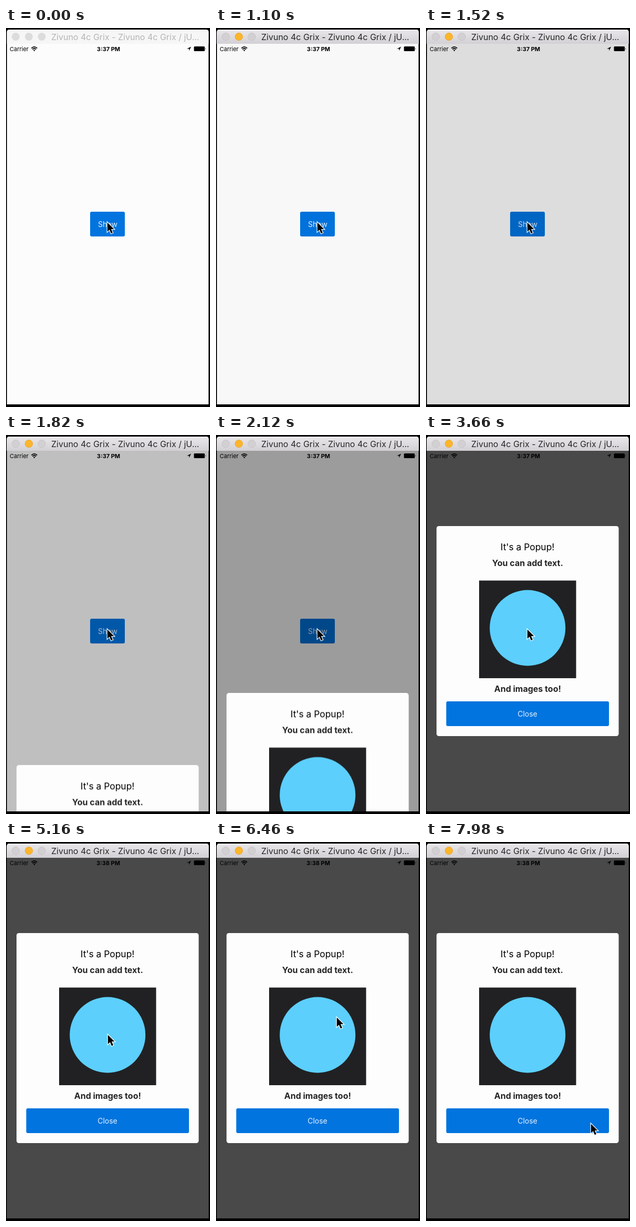
Write an HTML page that moves like this. It is 388 px wide and 720 px high and loops after 8 s.

```html
<!DOCTYPE html>
<html lang="en">
<head>
<meta charset="utf-8">
<title>Popup demo</title>
<style>
  html, body { margin: 0; width: 100%; height: 100%; overflow: hidden; background: #000; }
  svg { display: block; width: 388px; height: 720px; font-family: Inter, sans-serif; }
  .mid { text-anchor: middle; }
  .bold { font-weight: 700; }
  .button { fill: #0274df; }
  .label { font-size: 14px; fill: #e6f1fc; }
</style>
</head>
<body>
<svg viewBox="0 0 388 720">
  <defs>
    <linearGradient id="bar" x2="0" y2="1">
      <stop stop-color="#e9e7ea"/>
      <stop offset="1" stop-color="#d2d0d4"/>
    </linearGradient>
    <clipPath id="screen"><path d="M1.5 30H385.5V715H1.5Z"/></clipPath>
  </defs>

  <!-- window title bar -->
  <path d="M1.5 30V8q0-5 5-5H380.5q5 0 5 5V30Z" fill="#f6f6f6"/>
  <g fill="#dcdcdc">
    <circle cx="18.5" cy="16.5" r="7.5"/>
    <circle cx="43.5" cy="16.5" r="7.5"/>
    <circle cx="68" cy="16.5" r="7.5"/>
  </g>
  <g id="activeBar">
    <path d="M1.5 30V8q0-5 5-5H380.5q5 0 5 5V30Z" fill="url(#bar)"/>
    <g fill="#d3d0d3" stroke="#c2bfc2" stroke-width=".8">
      <circle cx="18.5" cy="16.5" r="7.2"/>
      <circle cx="43.5" cy="16.5" r="7.2" fill="#fdb52b" stroke="#e3a02a"/>
      <circle cx="68" cy="16.5" r="7.2"/>
    </g>
  </g>
  <text id="title" x="86" y="22.5" font-size="16">Zivuno 4c Grix - Zivuno 4c Grix / jU...</text>

  <g clip-path="url(#screen)">
    <rect x="1.5" y="30" width="384" height="685" fill="#fcfcfc"/>

    <!-- status bar -->
    <text x="7" y="43.8" font-size="11">Carrier</text>
    <path d="M48.3 38.3q5.5-4.8 11 0M50.3 40.5q3.5-3 7 0" fill="none" stroke="#000" stroke-width="1.7"/>
    <path d="M51.9 42.2q1.9-1.6 3.8 0L53.8 44.2Z"/>
    <g class="mid bold" font-size="11">
      <text id="early" x="195" y="43.8">3:37 PM</text>
      <text id="late" x="194.5" y="43.8">3:38 PM</text>
    </g>
    <path d="M352 35.5L348.3 43.5V39.5H344Z"/>
    <rect x="357.5" y="35" width="20.5" height="9" rx="1.5"/>
    <path d="M379 37.8q1.8 1.7 0 3.4Z"/>

    <rect class="button" x="160" y="349" width="66" height="47" rx="3"/>
    <text class="mid label" x="193.5" y="378">Show</text>

    <rect id="shade" x="1.5" y="30" width="384" height="685"/>

    <g id="popup">
      <rect x="20" y="173" width="346.5" height="399" rx="4.5" fill="#fdfdfd"/>
      <text class="mid" x="193" y="218.7" font-size="17.4">It's a Popup!</text>
      <g class="mid bold" font-size="16" fill="#252525">
        <text x="193.3" y="248.8">You can add text.</text>
        <text x="193.3" y="487.6">And images too!</text>
      </g>
      <rect x="101" y="276.500" width="184.5" height="185.5" fill="#212123"/>
      <circle cx="193.2" cy="366.5" r="72" fill="#5ccffd"/>
      <rect class="button" x="38.5" y="506" width="309.5" height="47" rx="3"/>
      <text class="mid label" x="193" y="535">Close</text>
    </g>
  </g>

  <path id="cursor" d="M.8 1.5V19L4.9 15.2L7.9 22.2L11 20.9L8 14H13.4Z"
        stroke="#fff" stroke-width="2.4" paint-order="stroke fill"/>
</svg>
<script>
const LOOP = 8000;
const FOCUS = 700, OPEN = 900, HALF = 2068, SETTLED = 3237, MINUTE = 4180;
const EASE_IN = 'cubic-bezier(.42, 0, 1, 1)';
const EASE_OUT = 'cubic-bezier(0, 0, .58, 1)';
const EASE_BOTH = 'ease-in-out';

// steps: [time in ms, value, easing towards the next step]
function play(id, property, steps) {
  const frames = steps.map(([ms, value, easing = 'linear']) =>
    ({ offset: ms / LOOP, [property]: value, easing }));
  document.getElementById(id).animate(frames, { duration: LOOP, iterations: Infinity });
}

function cut(id, property, at, before, after) {
  play(id, property, [[0, before], [at, before], [at, after], [LOOP, after]]);
}

function openWith(id, property, from, middle, to) {
  play(id, property, [
    [0, from], [OPEN, from, EASE_IN], [HALF, middle, EASE_OUT], [SETTLED, to], [LOOP, to]
  ]);
}

const at = (x, y) => `translate(${x}px, ${y}px)`;

cut('activeBar', 'opacity', FOCUS, 0, 1);
cut('title', 'fill', FOCUS, '#b5b5b5', '#262626');
cut('early', 'opacity', MINUTE, 1, 0);
cut('late', 'opacity', MINUTE, 0, 1);

openWith('shade', 'opacity', 0, .355, .71);
openWith('popup', 'transform', at(0, 686), at(0, 343), at(0, 0));

play('cursor', 'transform', [
  [0, at(192, 368)],
  [4500, at(192, 368), EASE_BOTH],
  [5100, at(193, 365)],
  [5600, at(193, 365), EASE_BOTH],
  [6400, at(229, 332)],
  [6700, at(229, 332), EASE_BOTH],
  [7800, at(313, 534)],
  [LOOP, at(313, 534)]
]);
</script>
</body>
</html>
```
